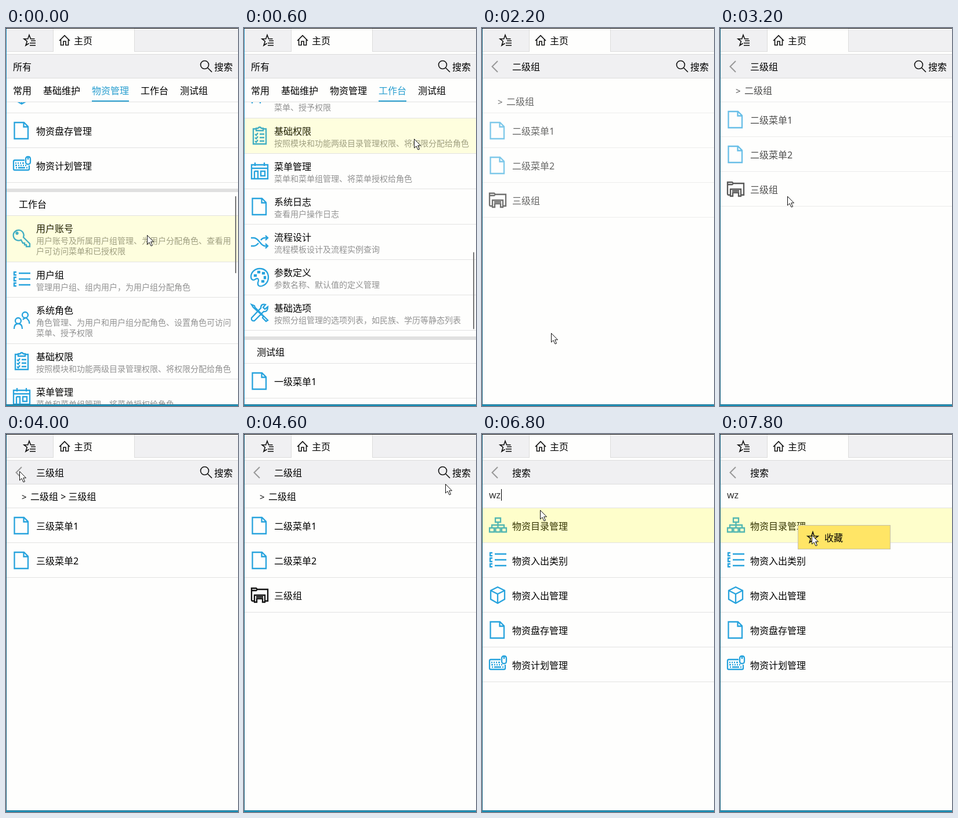
Write an HTML page that moves like this. It is 400 px wide and 652 px high and loops after 8 s.

```html
<!DOCTYPE html>
<html lang="zh-CN">
<head>
<meta charset="utf-8">
<style>
  html, body { margin: 0; width: 100%; height: 100%; overflow: hidden; background: #fefefd; }
  svg { display: block; width: 100%; height: 100%; }
  text { font-family: "Noto Sans", "Noto Sans CJK SC", "Noto Sans CJK", sans-serif; white-space: pre; }
  path { fill: none; }
</style>
</head>
<body>
<svg id="stage" viewBox="0 0 400 652"></svg>
<script>
const STEP = 200, STEPS = 40, SCROLL = 600;
const BLUE = '#27a3dd', LINE = '#e2e2e2', BAR = '#f0f0f2';

// Icons live in a 32 x 32 box.
const icons = {
  page: 'M3.5 2H20L27 9V30H3.5ZM19.5 2V9.5H27',
  keyboard: 'M21 7H4Q2 7 2 9V22Q2 24 4 24H27Q29 24 29 22V16M23 5Q23 1 27 1T31 5V10Q31 14 27 14T23 10ZM27 2V6M5 12h2m2 0h2m2 0h2m2 0h3M5 16h3m2 0h2m2 0h2m2 0h2m2 0h2M6 20h2m2 0h12m2 0h2',
  key: 'M15 18.5A9 9 0 1 1 19 14L30 25V30H24V27H21V24H18ZM6.5 7a1.5 1.5 0 1 0 3 0a1.5 1.5 0 1 0 -3 0',
  list: 'M11 5H31M11 15H31M11 25H31M7 3H3V8H7M7 12H3V18H7M7 22H3V27H7',
  roles: 'M17 7a5 5 0 1 0 10 0a5 5 0 1 0 -10 0M5 17a5 5 0 1 0 10 0a5 5 0 1 0 -10 0M3 31Q3 22 10 22T17 31M18 15Q22 10 26 14T29 22',
  clipboard: 'M10 4H5V30H27V4H22M10 7V3H13Q16 -1 19 3H22V7ZM8 13l2 2 3-4M16 13H24M8 19l2 2 3-4M16 19H24M8 25l2 2 3-4M16 25H24',
  window: 'M2 5H30V29H2ZM2 11H30M8 1V7M24 1V7M7 16H13V29M7 16V29M18 16H25V24H18Z',
  shuffle: 'M1 9H6C15 9 17 23 25 23H30M1 23H6C10 23 12 20 14 18M18 13C20 10 22 9 25 9H30M26 5L30 9L26 13M26 19L30 23L26 27',
  palette: 'M16 1C7 1 1 8 1 15C1 21 6 22 9 19C14 16 15 21 13 25C12 31 16 32 20 31C27 29 31 23 31 16C31 7 25 1 16 1ZM7 12h3v2h-3ZM13 6h3v2h-3ZM21 8h3v2h-3ZM24 15h2v3h-2ZM20 22h3v2h-3Z',
  tools: 'M2 2L7 4L8 7L26 25L30 29L27 31L21 25L22 22L5 7ZM30 6L25 10L22 7L26 2Q18 0 18 8L2 25Q1 31 7 30L23 14Q30 15 30 6ZM6 26h.1',
  group: 'M7 26H4Q2 26 2 24V4H10L12 6H30V26H25M2 8H10L12 6M7 28V16H25V28H21V22H11V28ZM10 19H22',
  cube: 'M16 2L28 8V23L16 30L4 23V8ZM4 8L16 14L28 8M16 14V30',
  tree: 'M12 3H21V10H12ZM16.5 10V20M6 20V15H27V20M2 20H10V27H2ZM12.5 20H20.5V27H12.5ZM23 20H31V27H23Z'
};

const rect = (x, y, w, h, fill) => `<rect x="${x}" y="${y}" width="${w}" height="${h}" fill="${fill}"/>`;
const label = (x, mid, s, fill = '#000', size = 16) =>
  `<text x="${x}" y="${mid + size * .37}" font-size="${size}" fill="${fill}">${s}</text>`;
const stroke = (d, color = '#111', width = 1.6) => `<path d="${d}" stroke="${color}" stroke-width="${width}"/>`;
const rule = y => rect(1, y, 399, 1, LINE);
const group = (body, attrs) => `<g ${attrs}>${body}</g>`;
const item = (icon, title, ...notes) => ({ icon, title, notes, h: [60, 61, 80][notes.length] });
const section = title => ({ section: title, h: 57 });

// Gives every entry the position of the rule above it.
function stack(top, entries) {
  return entries.map(e => { const placed = { ...e, top }; top += e.h; return placed; });
}

function drawEntry(e) {
  if (e.section) return rect(1, e.top + 11, 399, 6, '#e0e0e0') + label(22, e.top + 38, e.section) + rule(e.top + 57);
  const iconY = e.top + (e.h === 80 ? 24 : 15);
  const icon = group(stroke(icons[e.icon], e.icon === 'group' ? '#111' : BLUE, 2.3), `transform="translate(11 ${iconY})"`);
  const text = e.notes.length
    ? label(52, e.top + 23, e.title) + e.notes.map((n, i) => label(52, e.top + 43.5 + i * 18.5, n, '#929292', 14)).join('')
    : label(52, e.top + 32, e.title);
  return icon + text + rule(e.top + e.h);
}

function drawList(entries, mouseY, tint) {
  return entries.map(e => {
    const hot = tint && !e.section && mouseY > e.top && mouseY <= e.top + e.h;
    return drawEntry(e) + (hot ? rect(1, e.top + 1, 399, e.h - 1, `rgba(255,255,0,${tint})`) : '');
  }).join('');
}

const homeList = stack(86, [
  item('cube', '物资入出管理'), item('page', '物资盘存管理'), item('keyboard', '物资计划管理'),
  section('工作台'),
  item('key', '用户账号', '用户账号及所属用户组管理、为用户分配角色、查看用', '户可访问菜单和已授权限'),
  item('list', '用户组', '管理用户组、组内用户，为用户组分配角色'),
  item('roles', '系统角色', '角色管理、为用户和用户组分配角色、设置角色可访问', '菜单、授予权限'),
  item('clipboard', '基础权限', '按照模块和功能两级目录管理权限、将权限分配给角色'),
  item('window', '菜单管理', '菜单和菜单组管理、将菜单授权给角色'),
  item('page', '系统日志', '查看用户操作日志'),
  item('shuffle', '流程设计', '流程模板设计及流程实例查询'),
  item('palette', '参数定义', '参数名称、默认值的定义管理'),
  item('tools', '基础选项', '按照分组管理的选项列表，如民族、学历等静态列表'),
  section('测试组'),
  item('page', '一级菜单1'), item('page', '一级菜单2'), item('group', '二级组')
]);
const levelTwo = stack(127, [item('page', '二级菜单1'), item('page', '二级菜单2'), item('group', '三级组')]);
const levelThree = stack(127, [item('page', '三级菜单1'), item('page', '三级菜单2')]);
const matches = stack(127, [
  item('tree', '物资目录管理'), item('list', '物资入出类别'), item('cube', '物资入出管理'),
  item('page', '物资盘存管理'), item('keyboard', '物资计划管理'),
  item('tools', '系统维护'), item('page', '文档管理'), item('clipboard', '任务管理'), item('list', '位置管理')
]);
const tabs = [[12, '常用'], [64, '基础维护'], [148, '物资管理'], [232, '工作台'], [300, '测试组']];

// Pointer way points: step, x, y.
const pointer = [[0, 243, 357], [1, 243, 357], [4, 318, 108], [5, 318, 112], [6, 312, 137], [9, 119, 526], [11, 119, 526],
  [12, 119, 450], [15, 116, 290], [18, 116, 290], [20, 23, 64], [21, 23, 64], [23, 347, 86], [24, 352, 66],
  [25, 352, 66], [29, 83, 118], [33, 83, 118], [36, 134, 157], [38, 134, 157], [39, 158, 174]];

function pointerAt(k) {
  const i = Math.max(1, pointer.findIndex(p => p[0] >= k));
  const [a, x, y] = pointer[i - 1], [b, u, v] = pointer[i];
  const f = (k - a) / (b - a);
  return [x + (u - x) * f, y + (v - y) * f];
}

const scrollAt = k => {
  const f = Math.min(1, k / 5);
  return Math.round(SCROLL * f * f * (3 - 2 * f));
};

function home(k, x, y) {
  const scroll = scrollAt(k), active = scroll < 195 ? 2 : 3;
  const bar = tabs.map(([tx, s], i) => label(tx, 108, s, i === active ? '#2a9fd0' : '#000')
    + (i === active ? rect(tx, 125, s.length * 16, 2, '#2a9fd0') : '')).join('');
  const list = group(drawList(homeList, y + scroll, y > 128 && k < 10 ? .12 : 0), `transform="translate(0 ${-scroll})"`);
  return bar + rule(127) + group(list, 'clip-path="url(#body)"')
    + `<rect x="395" y="${290 + scroll * 149 / SCROLL}" width="2" height="133" rx="1" fill="#777"/>`;
}

const crumbs = (s, list) => (k, x, y) => label(27, 108, '&gt;', '#000', 15) + label(42, 108, s) + rule(127)
  + drawList(list, y, k === 14 || k === 15 ? .12 : 0);
const two = crumbs('二级组', levelTwo);
const three = crumbs('二级组 &gt; 三级组', levelThree);

function search(k, x, y) {
  const query = k < 31 ? '' : k < 33 ? 'w' : 'wz';
  const shown = k < 32 ? 0 : k < 34 ? matches.length : 5;
  const field = query ? label(12, 105, query, '#333') : label(12, 106, '请输入拼音简码或包含的文字...', '#777');
  const caret = k < 38 && k % 5 > 1 ? rect([12, 25, 33][query.length], 95, 1, 20, '#000') : '';
  const star = 'M160 169L162.3 176 169 176.3 163.7 180.4 165.6 187 160 183.2 154.4 187 156.3 180.4 151 176.3 157.7 176Z';
  const menu = k < 38 ? '' : '<rect x="134.5" y="157.5" width="159" height="41" fill="#ffe566" stroke="#c4c0a8"/>'
    + stroke(star) + label(180, 179, '收藏');
  const list = drawList(matches.slice(0, shown), k > 37 ? 157 : y, .2);
  return field + caret + rule(127) + group(list, 'clip-path="url(#body)"') + menu;
}

// From step, header, page, opacity, downward shift.
const scenes = [
  [0, '所有', home, 1, 0], [10, '二级组', home, .65, 0],
  [11, '二级组', two, .6, 19], [12, '二级组', two, 1, 0], [16, '三级组', two, .7, 0],
  [17, '三级组', three, .6, 19], [18, '三级组', three, 1, 0], [21, '二级组', three, .7, 0],
  [22, '二级组', two, .6, 19], [23, '二级组', two, 1, 0], [25, '搜索', two, .7, 0],
  [26, '搜索', search, 1, 0]
];

function frameBars(title) {
  const root = title === '所有';
  return rect(0, 0, 400, 41, BAR) + rect(0, 40, 400, 1, '#dcdcdc')
    + rect(81, 1, 141, 40, '#dcdcdc') + rect(82, 1, 139, 40, '#fefefd')
    + stroke('M49.5 18.7H42.5L40 12L37.7 18.7H31L36.3 23L34 30L39.5 26.5M43 22H51M41 26H51M41 30H51')
    + stroke('M92 22L101 13L110 22M94.5 20V29.5H99V23H103V29.5H107.5V20') + label(117, 22, '主页')
    + rect(0, 45, 400, 42, '#dcdcdc') + rect(0, 46, 400, 40, BAR)
    + (root ? '' : stroke('M27 57L17.5 66.5L27 76', '#999', 2)) + label(root ? 12 : 52, 67, title)
    + (title === '搜索' ? '' : stroke('M347.5 68.5L355 76M335.5 63.5a7 7 0 1 0 14 0a7 7 0 1 0 -14 0') + label(359, 67, '搜索'));
}

function draw(k) {
  const [x, y] = pointerAt(k);
  const [, title, page, opacity, shift] = scenes.filter(s => s[0] <= k).pop();
  const beam = page === search && k > 27 && k < 35 && y < 127;
  const cursor = beam
    ? stroke('M-3.5 -7H-1L0 -6L1 -7H3.5M0 -6V7M-3.5 8H-1L0 7L1 8H3.5', '#111', 1)
    : '<path d="M.5 .5V16L4 12.7L7 19L9.5 18L6.7 11.8H11.5Z" style="fill:#fff" stroke="#111"/>';
  stage.innerHTML = '<clipPath id="body"><rect y="128" width="400" height="521"/></clipPath>'
    + rect(0, 0, 400, 652, '#fefefd') + frameBars(title)
    + group(page(k, x, y), `opacity="${opacity}" transform="translate(0 ${shift})"`)
    + rect(0, 0, 400, 1, '#111') + rect(0, 1, 1, 651, k < 10 ? '#2594c4' : '#12607f')
    + rect(0, 649, 400, 3, '#1a90b8') + rect(0, 649, 400, 1, '#2c7894')
    + group(cursor, `transform="translate(${Math.round(x)} ${Math.round(y)})"`);
}

const stage = document.getElementById('stage');
const start = performance.now();
let shown = -1;
function tick() {
  const k = Math.floor((performance.now() - start) / STEP) % STEPS;
  if (k !== shown) draw(shown = k);
  requestAnimationFrame(tick);
}
tick();
</script>
</body>
</html>
```
